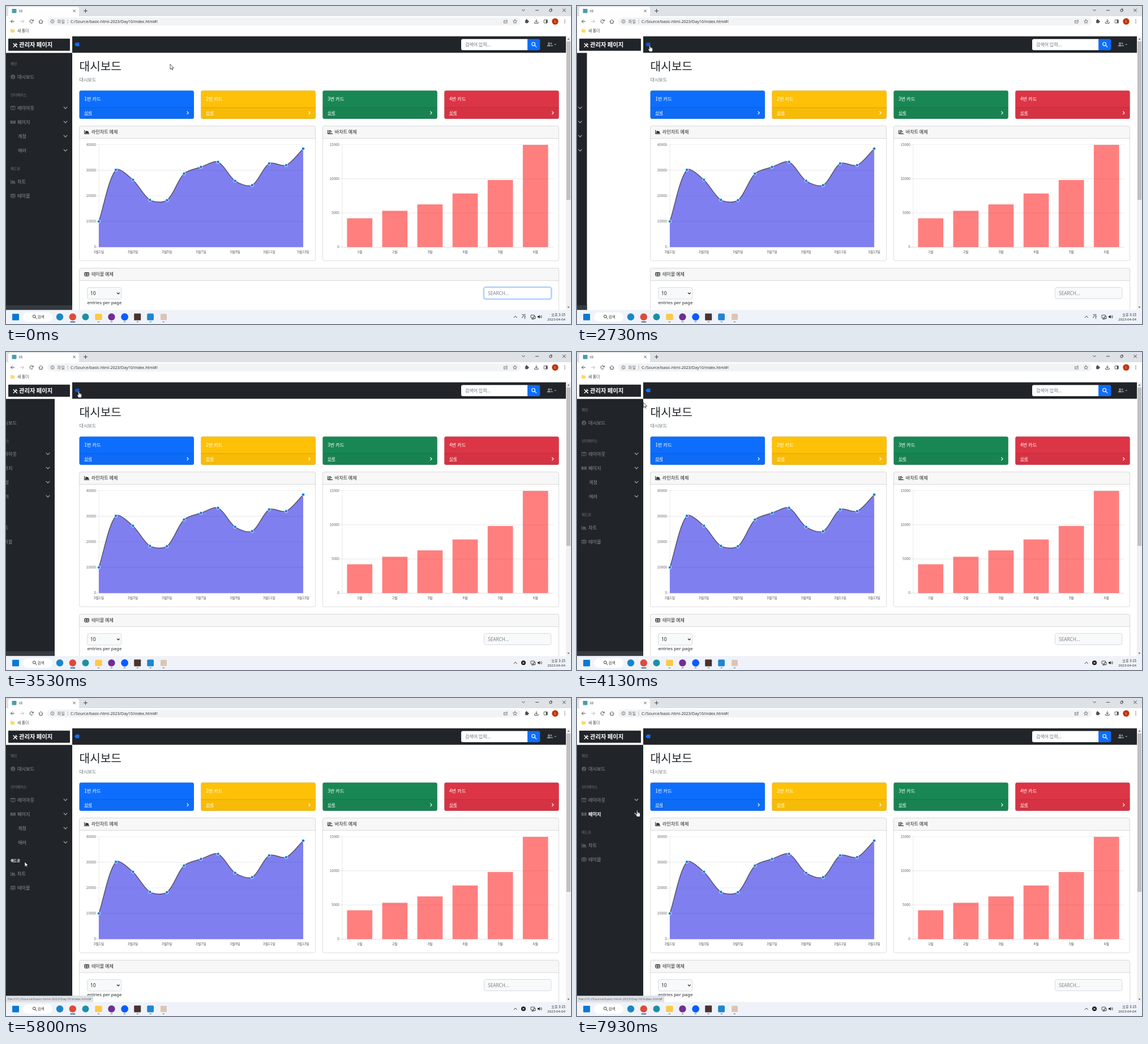
An HTML page with a canvas that plays this animation: 998x561 px, repeating every 8000 ms.

```html
<!DOCTYPE html>
<html lang="ko">
<head>
<meta charset="utf-8">
<title>관리자 페이지</title>
<style>
html, body { margin: 0; width: 100%; height: 100%; overflow: hidden; background: #fff; }
canvas { display: block; width: 998px; height: 561px; }
</style>
</head>
<body>
<canvas id="stage"></canvas>
<script>
const W = 998, H = 561, LOOP = 8000, TICK = 200 / 3;
const KR = '"Noto Sans CJK KR", "Noto Sans CJK JP", "Noto Sans CJK", sans-serif';
const UI = '"Open Sans", "Noto Sans CJK KR", sans-serif';
const BODY = '"Noto Sans", "Noto Sans CJK KR", sans-serif';
const DARK = '#212529', BLUE = '#0d6efd', GREY = '#5f6368';
const DIM = 'rgba(255,255,255,.25)', HALF = 'rgba(255,255,255,.5)';

const canvas = document.getElementById('stage');
const dpr = window.devicePixelRatio || 1;
canvas.width = W * dpr;
canvas.height = H * dpr;
const c = canvas.getContext('2d');

// ---- drawing helpers ----
function box(x, y, w, h, fill, r = 0, stroke, lw = 1) {
  c.beginPath();
  c.roundRect(x, y, w, h, r);
  if (fill) { c.fillStyle = fill; c.fill(); }
  if (stroke) { c.strokeStyle = stroke; c.lineWidth = lw; c.stroke(); }
}
function dot(x, y, r, fill, stroke, lw = 1) {
  c.beginPath();
  c.arc(x, y, r, 0, 7);
  if (fill) { c.fillStyle = fill; c.fill(); }
  if (stroke) { c.strokeStyle = stroke; c.lineWidth = lw; c.stroke(); }
}
// y is the visual middle of the line
function text(s, x, y, size, color, { weight = 400, align = 'left', font = KR } = {}) {
  c.font = `${weight} ${size}px ${font}`;
  c.textAlign = align;
  c.fillStyle = color;
  c.fillText(s, x, y + size * 0.37);
}
function shape(d, x, y, { fill, stroke, lw = 1, scale = 1 }) {
  const p = new Path2D(d);
  c.save();
  c.translate(x, y);
  c.scale(scale, scale);
  c.lineJoin = c.lineCap = 'round';
  if (fill) { c.fillStyle = fill; c.fill(p); }
  if (stroke) { c.strokeStyle = stroke; c.lineWidth = lw; c.stroke(p); }
  c.restore();
}
const stroke = (d, x, y, color, lw = 1) => shape(d, x, y, { stroke: color, lw });
const fill = (d, x, y, color) => shape(d, x, y, { fill: color });
const down = (x, y, color, r = 3, lw = 1.1) =>
  stroke(`M${-r} ${-r / 2}L0 ${r / 2}L${r} ${-r / 2}`, x, y, color, lw);
function lens(x, y, r, color, lw) {
  dot(x, y, r, null, color, lw);
  stroke(`M${r * 0.7} ${r * 0.7}L${r * 1.8} ${r * 1.8}`, x, y, color, lw);
}

// small glyphs, centred on x, y
const icons = {
  gauge(x, y, col) {
    dot(x, y, 3.9, col);
    stroke('M0 1.2L1.2 -2', x, y, DARK, .8);
    dot(x, y + 1.4, 1, DARK);
  },
  columns(x, y, col) {
    box(x - 3.7, y - 3, 7.4, 6, null, .6, col);
    stroke('M-3.6 -2.4H3.6M0 -2V3', x, y, col, 1);
  },
  book(x, y, col) {
    fill('M-4.6 -2.9Q-2 -3.4 -.4 -2.5V3Q-2 2.2 -4.6 2.6ZM4.6 -2.9Q2 -3.4 .4 -2.5V3Q2 2.2 4.6 2.6Z', x, y, col);
  },
  area(x, y, col) {
    stroke('M-3.8 -3.2V2.9H4', x, y, col, 1.1);
    fill('M-2.4 1.7V-.6L-.6 -2.8L.8 -1.2L2 -2L3.6 .2V1.7Z', x, y, col);
  },
  bars(x, y, col) {
    stroke('M-3.8 -3.2V2.9H4M-1.8 -2.6H1.2M-1.8 -.8H3M-1.8 1H.2', x, y, col, 1.1);
  },
  table(x, y, col) {
    box(x - 3.7, y - 3, 7.4, 6, null, .6, col);
    stroke('M-3.6 -2.3H3.6M-3.6 .5H3.6M0 -2V3', x, y, col, 1);
  },
  tools(x, y, col) {
    stroke('M-3 -3L3 3', x, y, col, 1.6);
    stroke('M-3 3L2 -2M1.4 -3.6Q.8 -1 3.6 -1.4', x, y, col, 1.3);
  },
};

// ---- timing ----
const clamp = v => Math.max(0, Math.min(1, v));
const ease = v => { v = clamp(v); return v * v * (3 - 2 * v); };

const path = [
  [340, 290, 103], [400, 284, 102], [670, 215, 88], [930, 156, 75], [1200, 130.5, 69.5],
  [1330, 128.3, 69], [3870, 128.3, 69], [3930, 127, 72], [4200, 114, 95], [4470, 82, 124],
  [4733, 48, 156], [4800, 46, 169], [5000, 45, 185], [5200, 42, 212], [5400, 38, 240],
  [5600, 35, 268], [5800, 33, 289], [5930, 33, 310], [6070, 36, 326], [6200, 62, 265],
  [6330, 100, 184], [6470, 105, 215], [6600, 106, 246], [6800, 106.2, 198],
  [7735, 106.2, 198], [7800, 105.5, 189], [7867, 105.5, 187], [7933, 106.2, 198],
];
function pointer(t) {
  const i = path.findIndex(k => k[0] > t);
  if (i === 0) return path[0].slice(1);
  if (i < 0) return path[path.length - 1].slice(1);
  const [t0, x0, y0] = path[i - 1], [t1, x1, y1] = path[i];
  const k = (t - t0) / (t1 - t0);
  return [x0 + (x1 - x0) * k, y0 + (y1 - y0) * k];
}
function navOffset(t) {
  return -117 * (ease((t - 2620) / 150) - ease((t - 3434) / 150));
}

// ---- browser frame ----
function browser() {
  box(0, 0, W, 18, '#dee1e6');
  box(4, 1.5, 125, 18, '#fff', 4);
  box(10.5, 5, 8, 7.5, '#4c9bb0', 1);
  text('sb', 22.5, 8.6, 6.2, '#45494d', { font: UI });
  stroke('M-1.8 -1.8L1.8 1.8M1.8 -1.8L-1.8 1.8', 120.5, 8.6, '#3c4043', .9);
  stroke('M-3 0H3M0 -3V3', 140.5, 8.6, '#3c4043', 1);
  down(914, 7.5, '#333', 2.3, .9);
  stroke('M-2.6 0H2.6', 938, 7.6, '#222', .8);
  box(960, 6, 3.8, 3.8, null, 1, '#222', .8);
  stroke('M1.2 -2.4H2.4Q3.2 -2.4 3.2 -1.6V.8', 961, 7.3, '#222', .7);
  stroke('M-2.5 -2.5L2.5 2.5M2.5 -2.5L-2.5 2.5', 986, 7.5, '#222', .8);

  box(0, 18, W, 35.5, '#fff');
  box(73, 20.2, 836, 14, '#f1f3f4', 7);
  stroke('M3 0H-3M-.3 -2.7L-3 0L-.3 2.7', 11.5, 27.2, '#4a4d51', 1);
  stroke('M-3 0H3M.3 -2.7L3 0L.3 2.7', 28.5, 27.2, '#babcbe', 1);
  c.beginPath();
  c.arc(45, 27.2, 3, .5, 5.4);
  c.strokeStyle = '#4a4d51';
  c.lineWidth = 1;
  c.stroke();
  fill('M3.7 -3.6V-.4H.5Z', 45, 27.2, '#4a4d51');
  stroke('M-3.6 0L0 -3.4L3.6 0M-2.5 -.6V3H2.5V-.6', 61.5, 27.4, '#4a4d51', 1);
  dot(82, 27.2, 3, null, GREY, .8);
  stroke('M0 -.2V1.5M0 -1.5V-1.4', 82, 27.2, GREY, .8);
  text('파일', 90.5, 27.2, 7.3, GREY);
  box(108.7, 23.5, .6, 7.5, '#9aa0a6');
  text('C:/Source/basic-html-2023/Day10/index.html#!', 114, 27.2, 7.05, '#27292c', { font: UI });
  stroke('M-1 -1.4H-3V3H2.6V1M-1.4 1Q-1 -1.2 2.8 -1.3M1.4 -3L3.2 -1.3L1.4 .3', 882.5, 27, GREY, .8);
  stroke('M0 -3.4L1 -1.1L3.5 -.9L1.6 .8L2.2 3.2L0 1.9L-2.2 3.2L-1.6 .8L-3.5 -.9L-1 -1.1Z', 899, 27.2, GREY, .8);
  box(917.2, 24.8, 5, 5.4, '#4a4d51', 1);
  dot(919.4, 24.4, 1.2, '#4a4d51');
  dot(922.6, 27.4, 1.2, '#4a4d51');
  stroke('M0 -3.4V1M-2 -.8L0 1.2L2 -.8M-3.3 1.4V3.2H3.3V1.4', 936.8, 27.2, '#4a4d51', 1);
  box(950.2, 24.4, 6, 5.6, null, .5, '#4a4d51', .9);
  box(953.7, 24.4, 2.5, 5.6, '#4a4d51');
  dot(970, 27.2, 5.7, '#bf360c');
  text('L', 970, 27.2, 5.6, '#fff', { align: 'center', font: UI });
  for (const d of [-2.6, 0, 2.6]) dot(987, 27.2 + d, .75, '#4a4d51');

  fill('M-3.4 -3H-.6L.4 -2H3.4V3.4H-3.4Z', 11.5, 43.4, '#fdd663');
  text('새 폴더', 20, 43.4, 6.8, '#3c4043');
}

function topbar(hot) {
  box(0, 53.5, 117, 29, '#fff');
  box(4.5, 58, 108, 20.5, DARK, 0, '#11151a', .8);
  icons.tools(16.2, 69.3, '#fff');
  text('관리자 페이지', 23, 68.3, 10.3, '#fff', { weight: 700 });
  box(117, 53.5, 872, 29.1, DARK);
  fill('M-4.6 0L-1.8 -3Q-1.4 -3.3 -1 -3.3H3Q3.9 -3.3 3.9 -2.4V2.4Q3.9 3.3 3 3.3H-1Q-1.4 3.3 -1.8 3Z',
    125.6, 67.7, hot ? '#0a58ca' : BLUE);
  box(804, 58.3, 117.5, 19.6, '#fff', [3, 0, 0, 3]);
  text('검색어 입력...', 811, 68, 8, '#6c757d');
  box(921.3, 58.3, 22, 19.6, BLUE, [0, 3, 3, 0]);
  lens(931.6, 67.2, 2.9, '#fff', 1.1);
  dot(959, 65.8, 1.9, '#8d9093');
  fill('M-3.4 3.4Q-3.2 0 0 0Q3.2 0 3.4 3.4Z', 959, 67.9, '#8d9093');
  dot(963, 66, 1.4, '#8d9093');
  fill('M0 3V.6Q2.8 .2 3 3Z', 963, 68, '#8d9093');
  fill('M-2 -1H2L0 1.2Z', 970.2, 68, '#8d9093');
}

// ---- page body ----
function heading(icon, x, y, s) {
  icons[icon](x + 13, y + .3, DARK);
  text(s, x + 21.3, y, 8.1, DARK);
}
function panel(x, y, w, h) {
  const edge = 'rgba(0,0,0,.176)';
  box(x, y, w, h, '#fff', 3.2);
  box(x, y, w, 22, '#f7f7f7', [3.2, 3.2, 0, 0]);
  box(x, y + 21.5, w, .7, edge);
  box(x, y, w, h, null, 3.2, edge, .8);
}
function card(i) {
  const x = 129.6 + i * 214.9, w = 202.3;
  const color = [BLUE, '#ffc107', '#198754', '#dc3545'][i];
  box(x, 149.3, w, 49.6, color, 3.2);
  box(x, 179, w, 19.9, 'rgba(0,0,0,.03)', [0, 0, 3.2, 3.2]);
  box(x, 178.7, w, .7, 'rgba(0,0,0,.176)');
  box(x, 149.3, w, 49.6, null, 3.2, 'rgba(0,0,0,.176)', .6);
  text(i + 1 + '번 카드', x + 8.6, 164, 8.3, '#fff');
  text('상세', x + 8.6, 188.4, 7.2, '#fff');
  box(x + 8.6, 192.2, 13.4, .6, '#fff');
  stroke('M-1.1 -2.4L1.3 0L-1.1 2.4', x + 191.4, 188.5, '#fff', 1.1);
}

const BASE = 425.2, TOP = 244.7;
function axis(left, right, max, step) {
  for (let v = 0; v <= max; v += step) {
    const y = BASE - v / max * (BASE - TOP);
    text(String(v), left - 5, y, 6.2, '#666', { align: 'right' });
    box(left - 4.5, y - .3, right - left + 4.5, .7, v ? 'rgba(0,0,0,.125)' : 'rgba(0,0,0,.25)');
  }
  box(left - .3, TOP, .7, BASE - TOP, 'rgba(0,0,0,.125)');
}
function lineChart() {
  const sales = [10000, 30162, 26263, 18394, 18287, 28682, 31274, 33259, 25849, 24159, 32651, 31984, 38451];
  const pts = sales.map((v, i) => [164 + i * 30.08, BASE - v / 40000 * (BASE - TOP)]);
  const last = pts.length - 1;
  const dist = (a, b) => Math.hypot(a[0] - b[0], a[1] - b[1]);
  const handles = pts.map((p, i) => {
    const a = pts[Math.max(0, i - 1)], b = pts[Math.min(last, i + 1)];
    const da = dist(a, p), db = dist(p, b), sum = da + db;
    const at = k => [p[0] + k * (b[0] - a[0]), p[1] + k * (b[1] - a[1])];
    return [at(-.3 * da / sum), at(.3 * db / sum)];
  });
  const curve = new Path2D();
  curve.moveTo(...pts[0]);
  for (let i = 1; i <= last; i++) curve.bezierCurveTo(...handles[i - 1][1], ...handles[i][0], ...pts[i]);
  const area = new Path2D(curve);
  area.lineTo(pts[last][0], BASE);
  area.lineTo(pts[0][0], BASE);
  axis(164, 525, 40000, 10000);
  c.fillStyle = 'rgba(2,0,226,.5)';
  c.fill(area);
  c.strokeStyle = '#53536b';
  c.lineWidth = 1.5;
  c.stroke(curve);
  pts.forEach(([x, y], i) => {
    dot(x, y, 2.6, '#0275d8', 'rgba(255,255,255,.85)', 1);
    if (i % 2 === 0) text(`3월${i + 1}일`, x, 433.6, 6.2, '#555', { align: 'center' });
  });
}
function barChart() {
  axis(593.8, 966.5, 15000, 5000);
  [4215, 5312, 6251, 7841, 9821, 14984].forEach((v, i) => {
    const x = 602.4 + i * 62.1, h = v / 15000 * (BASE - TOP);
    box(x, BASE - h, 44.7, h, 'rgba(255,0,0,.5)');
    text(i + 1 + '월', x + 22.4, 433.6, 6.2, '#555', { align: 'center' });
  });
}
function searchBox(focus, caret) {
  if (focus > 0) box(843.6, 495.6, 120.2, 21.8, null, 4, `rgba(13,110,253,${.25 * focus})`, 2.4);
  box(844.5, 496.5, 118.3, 20, focus > .5 ? '#fff' : '#f8f9fa', 3, focus > .5 ? '#86b7fe' : '#ced4da', .8);
  text('SEARCH...', 851.2, 506.6, 8.2, '#7b8288', { font: BODY });
  if (caret) box(851, 500.5, .7, 12.5, '#222');
}
function content(focus, caret) {
  text('대시보드', 129.6, 107, 20.2, DARK, { weight: 500 });
  text('대시보드', 129.4, 130, 8.15, '#6c757d');
  for (let i = 0; i < 4; i++) card(i);
  panel(129.6, 211.6, 417, 238);
  heading('area', 129.6, 222.2, '라인차트 예제');
  lineChart();
  panel(559.4, 211.6, 417, 238);
  heading('bars', 559.4, 222.2, '바차트 예제');
  barChart();
  panel(129.6, 462.5, 847, 90);
  heading('table', 129.6, 473, '테이블 예제');
  box(143.6, 496.6, 60, 20.4, '#f8f9fa', 3, '#ced4da', .8);
  text('10', 149, 507, 8.3, DARK, { font: BODY });
  down(198.3, 507, '#222', 2, 1.1);
  text('entries per page', 143.4, 523, 7.9, DARK, { font: BODY });
  searchBox(focus, caret);

  box(989, 53.5, 9, 483, '#f1f1f1');
  box(990, 62.5, 7, 279.5, '#c1c1c1');
  fill('M-2 1H2L0 -1.2Z', 993.5, 58.3, '#505050');
  fill('M-2 -1H2L0 1.2Z', 993.5, 531.5, '#505050');
}

// ---- side navigation ----
function navRows(folded) {
  const up = folded ? 50 : 0;
  const head = (s, y) => ({ s, y, head: true, reach: 9 });
  const link = (s, y, icon, arrow, x = 20) => ({ s, y, icon, arrow, x, reach: 12.4 });
  const inner = folded ? [] : [link('계정', 230, null, true, 21), link('에러', 255, null, true, 21)];
  return [
    head('메인', 102), link('대시보드', 125, 'gauge'),
    head('인터페이스', 157), link('레이아웃', 180, 'columns', true), link('페이지', 205, 'book', true),
    ...inner,
    head('애드온', 287 - up), link('차트', 310 - up, 'area'), link('테이블', 335 - up, 'table'),
  ];
}
function sidebar(rows, hot, dx) {
  if (dx <= -117) return;
  c.save();
  c.translate(dx, 0);
  box(0, 82.5, 117, 454, DARK);
  box(0, 528, 117, 8.5, '#343a40');
  for (const r of rows) {
    const on = r === hot;
    if (r.head) {
      text(r.s, 8.2, r.y, 6.15, on ? '#fff' : DIM, { weight: 700 });
      continue;
    }
    if (r.icon) icons[r.icon](12.3, r.y, DIM);
    text(r.s, r.x, r.y, 8.2, on ? '#fff' : HALF, { weight: on ? 700 : 400 });
    if (r.arrow) down(105, r.y - .4, on ? '#fff' : 'rgba(255,255,255,.6)', 2.9, 1.2);
  }
  c.restore();
}

function bubble(hash) {
  box(0, 525.5, hash ? 153.6 : 149.4, 11, '#dee1e6', [0, 2, 0, 0], '#c9ccd1', .5);
  text('file:///C:/Source/basic-html-2023/Day10/index.html' + (hash ? '#' : ''), 2.8, 530.8, 6.08, GREY, { font: UI });
}

// ---- taskbar ----
function taskbar(blocked) {
  box(0, 536.3, W, 25, '#eff3f9');
  box(11, 543, 12, 11.6, '#0a78d4', 1);
  box(30, 540.6, 52, 16.4, '#fff', 8.2);
  lens(49.8, 547.6, 2.4, '#222', .9);
  text('검색', 55.5, 548.7, 6.5, '#333');
  dot(95, 548.5, 6.2, '#1a86c8');
  dot(117.8, 548.5, 6.2, '#dd4b3c');
  dot(140.5, 548.5, 6, '#1d8fa3');
  box(157.3, 543, 12.4, 11, '#fcc94a', 1.5);
  dot(186.4, 548.5, 6.2, '#6f2f93');
  dot(209.6, 548.5, 6.4, '#0b5cff');
  box(226.2, 542.5, 12, 12, '#4a332e', 1);
  box(249.2, 542.6, 11.8, 11.8, '#1f86d0', 2);
  box(273, 543, 11, 11, '#dcc5b4', 1.5);
  box(113.4, 556.6, 9, 1.6, '#0067c0', .8);
  for (let i = 0; i < 6; i++) box(161.7 + i * 22.95, 556.6, 3.6, 1.5, '#8b8f95', .7);

  stroke('M-2.7 1.4L0 -1.4L2.7 1.4', 899.8, 548.3, '#222', .9);
  if (blocked) {
    dot(914, 548.3, 4, '#151515');
    stroke('M-1.4 -1.4L1.4 1.4M1.4 -1.4L-1.4 1.4', 914, 548.3, '#fff', 1);
  } else {
    text('가', 914.3, 548.3, 8.6, '#111', { align: 'center', weight: 500 });
  }
  box(927, 545.2, 6.6, 5, null, .5, '#222', .8);
  box(932, 547.6, 3, 4, '#eff3f9', 0, '#222', .8);
  stroke('M-1.5 2H2M0 .3V2', 930, 550.3, '#222', .8);
  fill('M-3.8 -1.2H-2.2L0 -3V3L-2.2 1.2H-3.8Z', 942.8, 548.3, '#222');
  stroke('M1.4 -1.4Q2.4 0 1.4 1.4M2.8 -2.5Q4.6 0 2.8 2.5', 942.8, 548.3, '#222', .7);
  text('오후 3:15', 988, 544.6, 6.2, '#222', { align: 'right' });
  text('2023-04-04', 988, 552.6, 6.1, '#222', { align: 'right', font: UI });
}

const ARROW = 'M0 0V8.6L2 6.8L3.4 9.8L4.7 9.2L3.4 6.4H6Z';
const HAND = 'M-.9 .8Q-.9 0 0 0Q.9 0 .9 .8V3.7Q2.2 3.3 2.6 4.2Q3.7 3.8 4 4.7Q5.3 4.4 5.3 5.6V8.4Q5.3 9.8 4.5 11.6H-.2Q-1.2 9.6 -2.4 8Q-3 6.9 -2.2 6.5Q-1.6 6.2 -.9 7.2Z';
function cursor(x, y, hand) {
  shape(hand ? HAND : ARROW, x, y, { fill: '#fff', stroke: '#111', lw: .7 });
  if (hand) stroke('M.9 3.8V6.4M2.6 4.3V6.5M4 4.8V6.6', x, y, '#333', .4);
}

function draw(time) {
  const t = Math.floor((time + 4) / TICK) * TICK;
  const [x, y] = pointer(t);
  const rows = navRows(t > 7390);
  const hot = x < 117 && y > 84 ? rows.find(r => Math.abs(y - r.y) < r.reach) : null;
  const onToggle = x > 119 && x < 133 && y > 58 && y < 79;
  const focus = 1 - clamp((t - 2500) / 150);
  const caret = t > 390 && t < 2520 && Math.floor((t - 395) / 533.4 + .03) % 2 === 0 &&
    !(t > 860 && t < 1390);

  c.setTransform(dpr, 0, 0, dpr, 0, 0);
  c.fillStyle = '#fff';
  c.fillRect(0, 0, W, H);
  content(focus, caret);
  sidebar(rows, hot, navOffset(t));
  browser();
  topbar(onToggle);
  if (t > 4460) bubble(t > 4790);
  taskbar(t > 2925);
  cursor(x, y, onToggle || (hot && !hot.head));
}

function loop() {
  draw(performance.now() % LOOP);
  requestAnimationFrame(loop);
}
loop();
</script>
</body>
</html>
```
